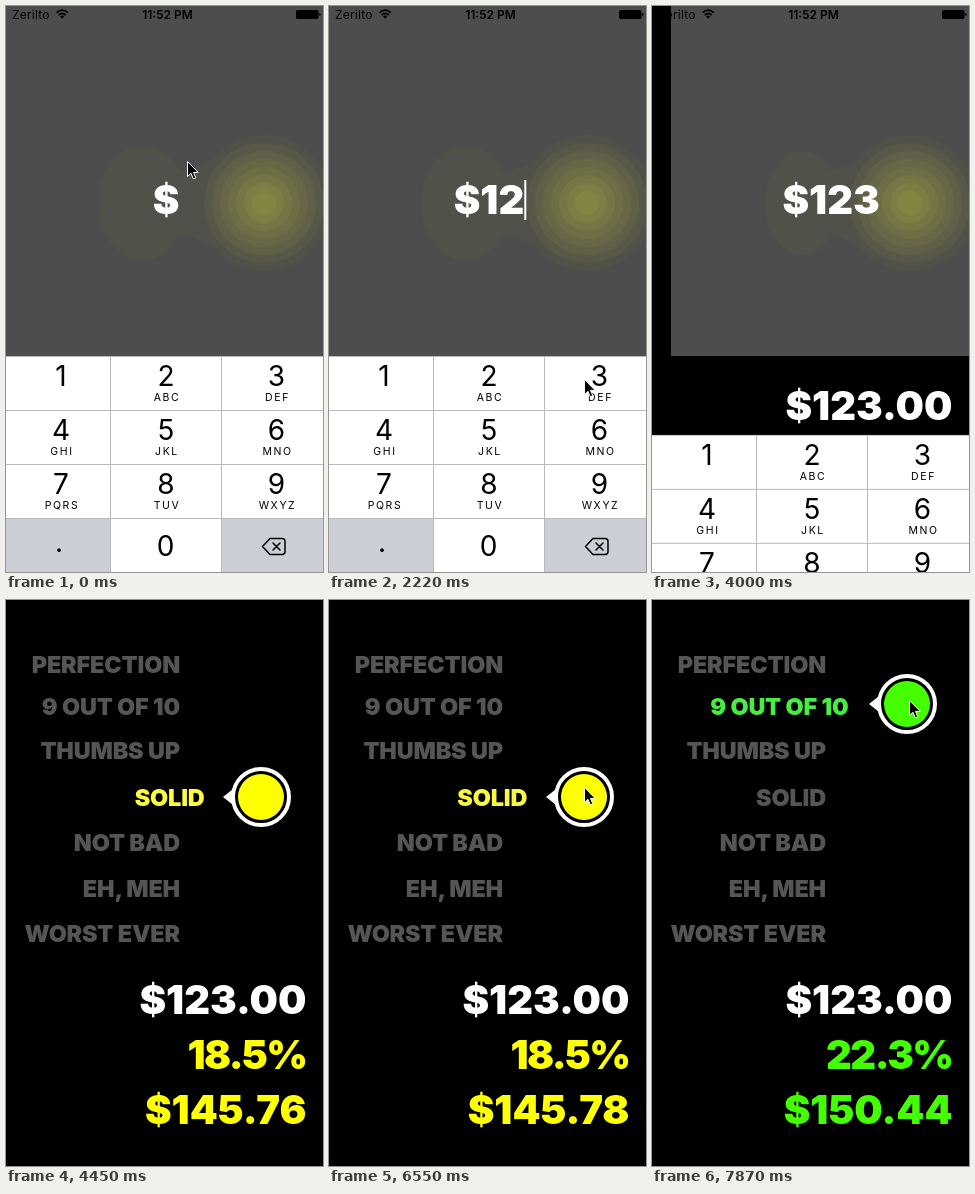
These frames come from a looping animation (317 px wide and 566 px high, 8 s). An HTML page:

```html
<!DOCTYPE html>
<html lang="en">
<head>
<meta charset="utf-8">
<title>Tip calculator</title>
<style>
  html, body { margin: 0; width: 100%; height: 100%; overflow: hidden; background: #000; }
  svg { display: block; width: 317px; height: 566px; font-family: Inter, "Open Sans", sans-serif; }
  .big { font-size: 40px; font-weight: 900; }
  .label { font-size: 23.4px; font-weight: 900; letter-spacing: -.15px; text-anchor: end; }
  .digit { font-size: 28px; text-anchor: middle; }
  .letters { font-size: 10.5px; letter-spacing: 1.6px; text-anchor: middle; }
  .end { text-anchor: end; }
  .mid { text-anchor: middle; }
  #percent { letter-spacing: -1.6px; }
</style>
</head>
<body>
<svg viewBox="0 0 317 566">
  <defs><clipPath id="clip"><rect id="window" width="317" height="350"/></clipPath></defs>
  <rect width="317" height="566"/>

  <g id="labels"></g>
  <g id="knob">
    <path d="M217 0L229 -9.5V9.5Z" fill="#fff"/>
    <circle cx="255" r="28" fill="#000" stroke="#fff" stroke-width="4"/>
    <circle id="dot" cx="255" r="23"/>
  </g>
  <text class="big end" x="300.5" y="414" fill="#fff">$123.00</text>
  <text class="big end" id="percent" x="300.5" y="469"></text>
  <text class="big end" id="total" x="300.5" y="524"></text>

  <g clip-path="url(#clip)">
    <rect width="317" height="350" fill="#4d4d4d"/>
    <g id="glow" fill="#51514a">
      <ellipse id="lobe" cy="197"/>
      <path d="M160 160Q185 172 206 152V242Q185 222 160 236Z"/>
    </g>
    <g id="field">
      <text class="big mid" id="amount" x="160" y="208" fill="#fff"></text>
      <rect id="caret" y="174" width="2" height="40" fill="#fff"/>
    </g>
  </g>

  <g id="keyboard"><rect y="350" width="317" height="216" fill="#b9babd"/></g>

  <g id="status">
    <text x="6" y="12.5" font-size="12" letter-spacing=".2">Zerilto</text>
    <path d="M50.6 6.6Q56.2 1.6 61.8 6.6M52.7 9Q56.2 5.9 59.7 9" fill="none" stroke="#000" stroke-width="1.8"/>
    <path d="M54 10.3Q56.2 8.6 58.4 10.3L56.2 12.8Z"/>
    <text class="mid" x="161.5" y="12.5" font-size="12" font-weight="600">11:52 PM</text>
    <rect x="290" y="4" width="22.5" height="9" rx="1.8"/>
    <path d="M313.2 7q1.5 .3 1.5 1.5t-1.5 1.5z"/>
  </g>

  <path id="cursor" d="M.5 .5V15.6L4 12.3L6.3 17.8L8.8 16.8L6.5 11.4H11.2Z" stroke="#fff" stroke-linejoin="round"/>
</svg>

<script>
const LOOP = 8000;
const TICK = 148.5; // the screen refreshes in steps of this many ms
const LEAD = 16;

const $ = id => document.getElementById(id);
const set = (id, name, value) => $(id).setAttribute(name, value);
const clamp = v => Math.max(0, Math.min(1, v));
const mix = (a, b, p) => a + (b - a) * p;
const rgb = c => `rgb(${c.map(Math.round)})`;
const show = (id, on) => set(id, "visibility", on ? "visible" : "hidden");

function add(parent, tag, attrs, text) {
  const el = document.createElementNS("http://www.w3.org/2000/svg", tag);
  for (const key in attrs) el.setAttribute(key, attrs[key]);
  if (text) el.textContent = text;
  return $(parent).appendChild(el);
}

function ease(n, start, end) {
  const p = clamp((n - start) / (end - start));
  return p * p * (3 - 2 * p);
}

// Pointer moves: first tick, last tick, x, y
const moves = [
  [0, 6, 62, 372], [8, 11, 160, 373], [13, 15, 255, 373], [19, 24, 117, 215],
  [33, 34, 311, 192], [34, 38, 255, 187], [43.6, 53, 257, 100]
];
const taps = [7, 12, 16]; // ticks at which 1, 2 and 3 are pressed

// Rating labels with their baselines
const GREY = [85, 85, 85];
const labels = [
  ["PERFECTION", 73], ["9 OUT OF 10", 115], ["THUMBS UP", 159], ["SOLID", 206],
  ["NOT BAD", 250.5], ["EH, MEH", 297], ["WORST EVER", 342]
].map(([text, y]) => ({ mid: y - 8.6, el: add("labels", "text", { class: "label", y }, text) }));

// Banded light behind the entry panel
for (let i = 0; i < 8; i++) {
  const c = mix(81, 132, i / 7);
  add("glow", "circle", { cx: 258, cy: 197, r: 68 - 8 * i, fill: rgb([c, c, mix(74, 67, i / 7)]) });
}

// Number pad
const KEY_GREY = "#ccced5";
const centers = [55, 160, 270.5];
const groups = ["", "ABC", "DEF", "GHI", "JKL", "MNO", "PQRS", "TUV", "WXYZ"];
const keys = [];
for (let i = 0; i < 12; i++) {
  const col = i % 3, top = 350 + Math.floor(i / 3) * 54;
  keys.push(add("keyboard", "rect", {
    x: 111 * col - 6, y: top + 1, width: 110, height: 53,
    fill: i === 9 || i === 11 ? KEY_GREY : "#fff"
  }));
  if (i < 9) {
    add("keyboard", "text", { class: "digit", x: centers[col], y: top + 30 }, String(i + 1));
    add("keyboard", "text", { class: "letters", x: centers[col] + 1, y: top + 45 }, groups[i]);
  }
}
add("keyboard", "text", { class: "digit", x: 53, y: 546 }, ".");
add("keyboard", "text", { class: "digit", x: 159.5, y: 550 }, "0");
add("keyboard", "path", {
  d: "M264 532.5H276Q279 532.5 279 535.5V545.5Q279 548.5 276 548.5H264L256.5 540.5ZM267 537l7 7m0 -7l-7 7",
  fill: "none", stroke: "#000", "stroke-width": 1.5, "stroke-linecap": "round", "stroke-linejoin": "round"
});

function drawEntry(n) {
  const count = taps.filter(tap => n > tap).length;
  const slide = 317 * clamp((n - 25.7) / 4) ** 2.5;
  const leaving = slide > 0;

  $("amount").textContent = "$" + "123".slice(0, count);
  set("caret", "x", 160 + $("amount").getComputedTextLength() / 2);
  show("caret", count > 0 && n < 20);
  set("field", "transform", `translate(${slide})`);
  set("window", "x", slide);
  set("keyboard", "transform", `translate(0 ${216 * ease(n, 25.65, 28.95)})`);

  set("lobe", "cx", leaving ? 150 : 137);
  set("lobe", "rx", leaving ? 37 : 45);
  set("lobe", "ry", leaving ? 52 : 57);
  taps.forEach((tap, i) => keys[i].setAttribute("fill", n === tap ? KEY_GREY : "#fff"));
}

function drawRating(n) {
  const pressed = n >= 41 ? 0.4 : 0;
  const lift = Math.max(pressed, 95 * ease(n, 43.61, 53.878));
  const y = 197 - lift;
  const total = 145.76 + lift * 0.0503;
  const red = 255 * (1 - lift / 127);

  set("knob", "transform", `translate(0 ${Math.round(y)})`);
  $("percent").textContent = ((total / 123 - 1) * 100).toFixed(1) + "%";
  $("total").textContent = "$" + total.toFixed(2);
  for (const id of ["dot", "percent", "total"]) set(id, "fill", rgb([red, 255, 0]));

  // The label nearest the knob slides towards it and lights up.
  const lit = [red, 255, 64];
  for (const { el, mid } of labels) {
    const near = clamp(1 - Math.abs(y - mid) / 24);
    el.setAttribute("x", 174 + 25 * near);
    el.setAttribute("fill", rgb(GREY.map((g, i) => mix(g, lit[i], near))));
  }
}

function drawCursor(n) {
  let x = 181, y = 155;
  for (const [start, end, toX, toY] of moves) {
    const p = ease(n, start, end);
    x = mix(x, toX, p);
    y = mix(y, toY, p);
  }
  set("cursor", "transform", `translate(${Math.round(x)} ${Math.round(y)})`);
  show("cursor", n < 26 || n >= 35);
}

function render(time) {
  const n = Math.floor((time + LEAD) / TICK);
  drawEntry(n);
  drawRating(n);
  drawCursor(n);
}

const start = performance.now();
function loop() {
  render((performance.now() - start) % LOOP);
  requestAnimationFrame(loop);
}
loop();
</script>
</body>
</html>
```
